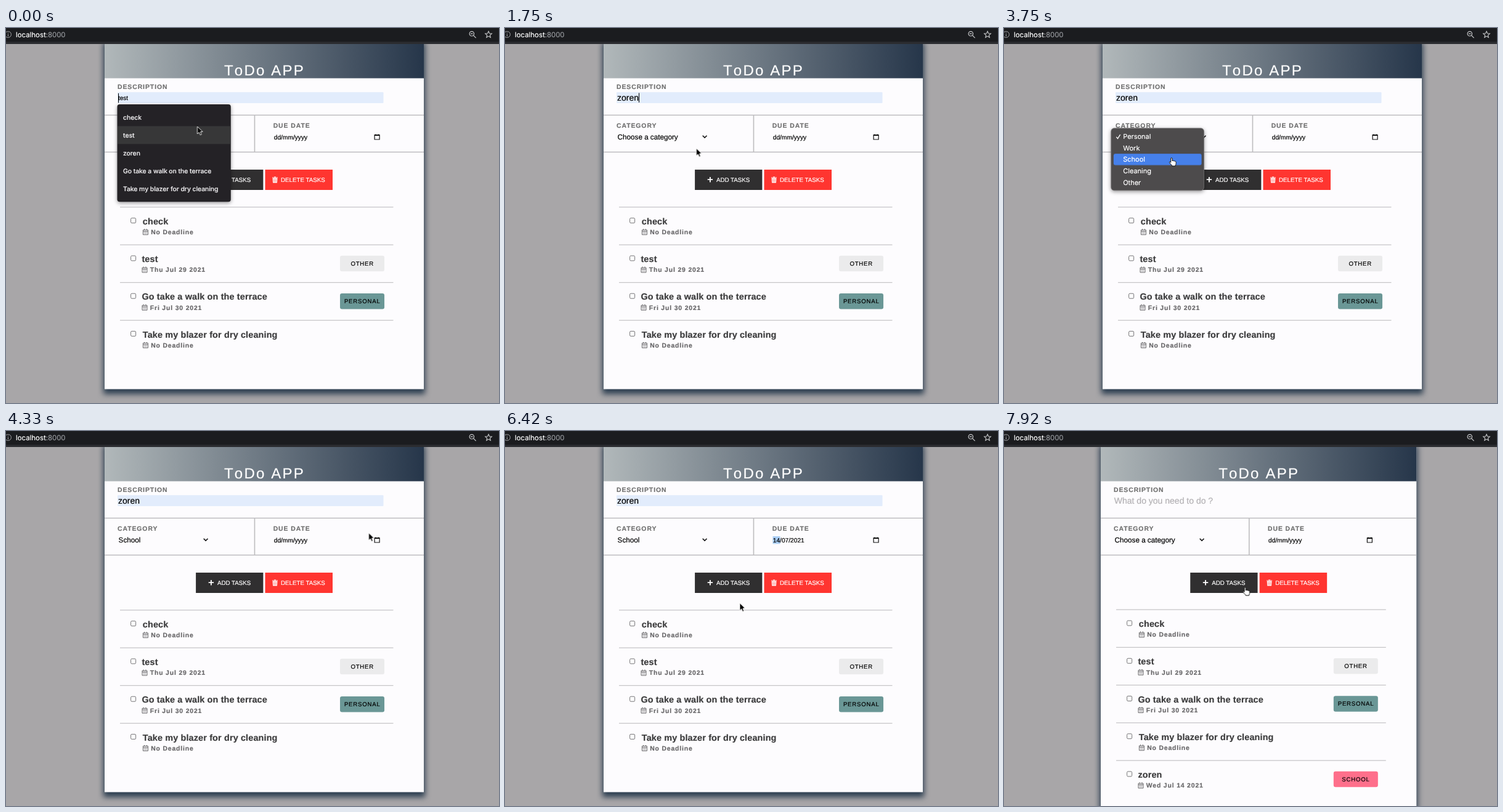
Write an HTML page that moves like this. It is 800 px wide and 609 px high and loops after 8000 ms.

```html
<!DOCTYPE html>
<html lang="en">
<head>
<meta charset="utf-8">
<title>ToDo APP</title>
<style>
  html, body { margin: 0; width: 100%; height: 100%; overflow: hidden; background: #a8a6a8; }
  svg { display: block; width: 800px; height: 609px; font-family: "Liberation Sans", Arial, sans-serif; }
  /* the hairline stroke gives text its slightly heavy rendering */
  text {
    white-space: pre; text-rendering: geometricPrecision;
    fill: currentColor; stroke: currentColor; stroke-width: .2px;
  }

  .shadow { filter: blur(4.8px); }
  .title { font-size: 24px; letter-spacing: 2.2px; font-kerning: none; color: #fff; }
  .label { font-size: 10.4px; font-weight: 700; letter-spacing: .95px; color: #707070; }
  .value { font-size: 14px; }
  .preview { font-size: 10px; }
  .hint { font-size: 14px; color: #b2b0b3; }
  .choice { font-size: 11.7px; }
  .date { font-size: 10.2px; }
  .button { font-size: 9.75px; color: #fff; }
  .task { font-size: 14.4px; font-weight: 700; letter-spacing: .15px; color: #3c3c3d; }
  .due { font-size: 10.4px; font-weight: 700; letter-spacing: .85px; color: #69686a; }
  .tag { font-size: 9.6px; letter-spacing: .8px; text-anchor: middle; }
  .rule { stroke: #bdbcbe; stroke-width: 1.6; }
  .thin { stroke: #c6c5c7; stroke-width: 1.2; }
  .line { fill: none; stroke: currentColor; }
  .suggest text { font: 500 10.4px Inter, sans-serif; letter-spacing: -.05px; color: #f1f0f2; }
  .menu text { font: 11px Inter, sans-serif; color: #fff; }
  .picker text { font-size: 8.7px; text-anchor: middle; }
  .picker .start { text-anchor: start; font-weight: 700; }
  .picker .faint { color: #757575; }
  .picker .today { color: #fff; font-weight: 700; }
  .picker .link { color: #1268e8; text-anchor: start; }
  .url { font: 11.4px Inter, sans-serif; color: #fff; }
  .port { color: #96999d; fill: currentColor; stroke: currentColor; }
  .popup { filter: drop-shadow(0 2px 3px #0006); }

  /* every hard change shares one 8 s clock */
  [class*="at-"] { animation: 8s step-end infinite; }
  .at-form { animation-name: form; }
  .at-added { animation-name: added; }
  .at-suggest { animation-name: suggest; }
  .at-first { animation-name: first; }
  .at-second { animation-name: second; }
  .at-filled { animation-name: filled; }
  .at-caret1 { animation-name: caret1; }
  .at-caret2 { animation-name: caret2; }
  .at-row { animation-name: row; }
  .at-menu { animation-name: menu; }
  .at-option { animation-name: option; }
  .at-unset { animation-name: unset-choice; }
  .at-chosen { animation-name: chosen; }
  .at-picker { animation-name: picker; }
  .at-day { animation-name: day; }
  .at-focus { animation-name: focus; }
  .at-nodate { animation-name: nodate; }
  .at-dated { animation-name: dated; }
  .at-arrow { animation-name: arrow; }
  .at-hand { animation-name: hand; }
  .pointer { animation: pointer 8s ease-in-out infinite; }

  @keyframes form { 0% { opacity: 1 } 92.75%, 100% { opacity: 0 } }
  @keyframes added { 0% { opacity: 0 } 92.75%, 100% { opacity: 1 } }
  @keyframes suggest { 0% { opacity: 1 } 21.875%, 100% { opacity: 0 } }
  @keyframes first { 0% { opacity: 1 } 9%, 100% { opacity: 0 } }
  @keyframes second { 0% { opacity: 0 } 9% { opacity: 1 } 21.875%, 100% { opacity: 0 } }
  @keyframes filled { 0% { opacity: 0 } 21.875%, 100% { opacity: 1 } }
  @keyframes caret1 { 0% { opacity: 1 } 6.25% { opacity: 0 } 12.5% { opacity: 1 } 18.75%, 100% { opacity: 0 } }
  @keyframes caret2 { 0% { opacity: 0 } 21.875% { opacity: 1 } 28.125%, 100% { opacity: 0 } }
  @keyframes row { 0% { transform: none } 9%, 100% { transform: translateY(29.1px) } }
  @keyframes menu { 0% { opacity: 0 } 29.125% { opacity: 1 } 49%, 100% { opacity: 0 } }
  @keyframes option {
    0% { transform: none } 40.6% { transform: translateY(18.6px) }
    43.5%, 100% { transform: translateY(37.2px) }
  }
  @keyframes unset-choice { 0% { opacity: 1 } 49%, 100% { opacity: 0 } }
  @keyframes chosen { 0% { opacity: 0 } 49%, 100% { opacity: 1 } }
  @keyframes picker { 0% { opacity: 0 } 60.4% { opacity: 1 } 71.875%, 100% { opacity: 0 } }
  @keyframes day { 0% { opacity: 0 } 66% { opacity: 1 } 71.875%, 100% { opacity: 0 } }
  @keyframes focus { 0% { opacity: 0 } 60.4%, 100% { opacity: 1 } }
  @keyframes nodate { 0% { opacity: 1 } 71.875%, 100% { opacity: 0 } }
  @keyframes dated { 0% { opacity: 0 } 71.875%, 100% { opacity: 1 } }
  @keyframes arrow { 0% { opacity: 1 } 25% { opacity: 0 } 49.8% { opacity: 1 } 86%, 100% { opacity: 0 } }
  @keyframes hand { 0% { opacity: 0 } 25% { opacity: 1 } 49.8% { opacity: 0 } 86%, 100% { opacity: 1 } }
  @keyframes pointer {
    0%, 5% { transform: translate(310.5px, 160px) }
    11.25%, 21.875% { transform: translate(310.5px, 195.5px) }
    26%, 38.5% { transform: translate(290.5px, 185px) }
    46.25%, 49% { transform: translate(272px, 211px) }
    54.125% { transform: translate(588.5px, 165.5px) }
    57.5%, 60.4% { transform: translate(600px, 175px) }
    67.5%, 71.875% { transform: translate(504.5px, 289.5px) }
    79.5%, 80.5% { transform: translate(381px, 279.5px) }
    87.5%, 100% { transform: translate(391.5px, 254px) }
  }
</style>
</head>
<body>
<svg id="stage" viewBox="0 0 800 609"></svg>
<script>
const text = (x, y, cls, str) => `<text x="${x}" y="${y}" class="${cls}">${str}</text>`;
const rect = (x, y, w, h, fill, rest = '') =>
  `<rect x="${x}" y="${y}" width="${w}" height="${h}" fill="${fill}" ${rest}/>`;
const line = (x1, y1, x2, y2, cls) => `<path d="M${x1} ${y1}L${x2} ${y2}" class="${cls}"/>`;
const icon = (x, y, d, color, width = 1) =>
  `<path class="line" transform="translate(${x} ${y})" d="${d}" color="${color}" stroke-width="${width}"/>`;
const group = (cls, ...parts) => `<g class="${cls}">${parts.join('')}</g>`;

const TAGS = { OTHER: '#ebebec', PERSONAL: '#6a9796', SCHOOL: '#fe6f8b' };
const TASKS = [
  ['check', 'No Deadline'],
  ['test', 'Thu Jul 29 2021', 'OTHER'],
  ['Go take a walk on the terrace', 'Fri Jul 30 2021', 'PERSONAL'],
  ['Take my blazer for dry cleaning', 'No Deadline'],
];
const NEW_TASK = ['zoren', 'Wed Jul 14 2021', 'SCHOOL'];

const smallCalendar = 'M.6 1.8h8v7.7h-8zM.6 4h8M2.7 0v2M6.5 0v2M2.3 5.6h1M4.1 5.6h1M5.9 5.6h1M2.3 7.5h1M4.1 7.5h1M5.9 7.5h1';

function taskRow([name, due, tag], i, left, right, top) {
  const y = top + i * 61.25;
  const x = left + (tag ? 60.4 : 61.8);
  const tagX = left + .7375 * (right - left);
  return line(left + 25, y, right - 49.5, y, 'thin')
    + rect(left + 42.6, y + 17.9, 8, 8, '#fff', 'rx="1.6" stroke="#757477"')
    + text(x, y + 28, 'task', name)
    + icon(x, y + 35.4, smallCalendar, '#69686a')
    + text(x + 13.4, y + 44.2, 'due', due)
    + (tag ? rect(tagX, y + 17.6, 72, 25.6, TAGS[tag], 'rx="3.2"')
      + text(tagX + 36.2, y + 33.8, 'tag', tag) : '');
}

function page({ cls, left, right, bottom, listTop, tasks, fields }) {
  const width = right - left;
  const mid = left + width / 2;
  const split = left + .47 * width;
  const add = mid - 110.9, del = mid + 1.5;
  return group(cls,
    rect(left - 2, 24, width + 4, bottom - 16, '#2c3e50', 'class="shadow"'),
    rect(left, 20, width, bottom - 20, '#fdfcfe'),
    rect(left, 26, width, 55.6, 'url(#slate)'),
    text(mid - 65, 76.5, 'title', 'ToDo APP'),
    text(left + 21, 98.9, 'label', 'DESCRIPTION'),
    line(left, 141.5, right, 141.5, 'rule'),
    line(left, 201.5, right, 201.5, 'rule'),
    line(split, 141.5, split, 201.5, 'rule'),
    text(left + 21, 161.8, 'label', 'CATEGORY'),
    icon(left + 160.7, 174.7, 'M0 0l3.4 3.4 3.4-3.4', '#111', 1.6),
    text(split + 30.2, 161.8, 'label', 'DUE DATE'),
    icon(right - 80.5, 172.4, 'M.6 1.2h8v7.4h-8zM.6 2h8M2.2 0v1M7 0v1', '#111', 1.2),
    rect(add, 230, 109.3, 33, '#302f30'),
    icon(add + 20.6, 242, 'M4.2 0v8.4M0 4.2h8.4', '#fff', 1.8),
    text(add + 34.9, 249.9, 'button', 'ADD TASKS'),
    rect(del, 230, 109.5, 33, '#ff3530'),
    icon(del + 11.5, 241.8, 'M0 1.2h9M3 .3h3', '#fff', 1.2),
    `<path transform="translate(${del + 12.1} 244)" d="M0 0h7.8l-.5 7.6h-6.8z" fill="#fff"/>`,
    icon(del + 14, 245.2, 'M0 0v5M2 0v5M4 0v5', '#ff3530', .6),
    text(del + 25.5, 249.9, 'button', 'DELETE TASKS'),
    ...tasks.map((task, i) => taskRow(task, i, left, right, listTop)),
    fields(left, split));
}

const busyFields = (left, split) => [
  rect(181, 104.3, 431.5, 17.7, '#e2ecfc', 'rx="1"'),
  text(182, 117.4, 'preview at-first', 'test'),
  text(182, 117.4, 'preview at-second', 'zoren'),
  text(182, 117.9, 'value at-filled', 'zoren'),
  rect(182, 106, 1, 15.5, '#000', 'class="at-caret1"'),
  rect(217, 105.5, 1, 15.5, '#000', 'class="at-caret2"'),
  text(left + 22.6, 180.6, 'choice at-unset', 'Choose a category'),
  text(left + 22.6, 180.6, 'choice at-chosen', 'School'),
  rect(434.5, 171, 12, 12.3, '#a9cdf4', 'class="at-focus"'),
  text(split + 31.3, 180.6, 'date at-nodate', 'dd/mm/yyyy'),
  text(split + 31.3, 180.6, 'date at-dated', '14/07/2021'),
].join('');

const emptyFields = (left, split) =>
  text(left + 21.8, 117.6, 'hint', 'What do you need to do ?')
  + text(left + 22.6, 180.6, 'choice', 'Choose a category')
  + text(split + 31.3, 180.6, 'date', 'dd/mm/yyyy');

function suggestions() {
  const names = ['check', 'test', 'zoren', TASKS[2][0], TASKS[3][0]];
  return group('at-suggest', group('suggest popup',
    rect(180.5, 124, 184.3, 158.3, '#242226', 'rx="4"'),
    rect(181, 159.3, 183.3, 29.1, '#373738', 'class="at-row"'),
    ...names.map((name, i) => text(190, 149 + i * 29.1, '', name))));
}

function categoryMenu() {
  const names = ['Personal', 'Work', 'School', 'Cleaning', 'Other'];
  return group('at-menu', group('menu popup',
    rect(173.8, 162.8, 150.6, 101, '#4d4b4c', 'rx="5" stroke="#777577" stroke-width=".8"'),
    rect(177.8, 167, 142.8, 18.6, '#4680ea', 'rx="3" class="at-option"'),
    icon(182.3, 173.2, 'M0 3.6l2.2 2.8L6.3 0', '#fff', 1.3),
    ...names.map((name, i) => text(193.2, 180.2 + i * 18.6, '', name))));
}

function datePicker() {
  const colX = c => 451.7 + c * 20.4;
  const days = Array.from({ length: 42 }, (_, i) => {
    const day = i < 4 ? 27 + i : (i - 4) % 31 + 1;
    const faint = i < 4 || i > 34;
    const cls = faint ? 'faint' : day === 30 ? 'today' : '';
    return text(colX(i % 7), 252.6 + Math.floor(i / 7) * 20.4, cls, day);
  });
  return group('at-picker', group('picker',
    rect(433.5, 184.5, 159.3, 204.5, '#fff', 'stroke="#767578" class="popup"'),
    text(441.5, 204.9, 'start', 'July 2021'),
    '<path d="M483.5 200.4h5.4l-2.7 3z"/>',
    icon(550.6, 196.6, 'M0 11V.7M-5 5.6L0 .6l5 5', '#222'),
    icon(574.2, 196.6, 'M0 0v10.3M-5 5.4l5 5 5-5', '#222'),
    ...[...'SMTWTFS'].map((d, c) => text(colX(c), 230.5, '', d)),
    rect(502.8, 280, 20.2, 20, '#a9cdf4', 'class="at-day"'),
    rect(543.5, 320.4, 20.4, 20.2, '#1064f0'),
    ...days,
    text(553, 377, 'link', 'Today')));
}

const browserBar = rect(0, 0, 800, 26, '#2b2c30') + rect(0, 0, 800, 22.3, '#1b1c1f')
  + '<circle cx="3.4" cy="10.5" r="5" fill="none" stroke="#a5a6a9"/>'
  + icon(3.4, 7.5, 'M0 0v1.2M0 2.6v3.6', '#a5a6a9', 1.1)
  + text(16, 14.7, 'url', 'localhost<tspan class="port">:8000</tspan>')
  + '<circle cx="755.8" cy="9.3" r="3.7" fill="none" stroke="#c9cacc" stroke-width="1.2"/>'
  + icon(754, 9.3, 'M0 0h3.6M4.6 2.8l4 4', '#c9cacc', 1.2)
  + icon(783, 5.3, 'M0 0l1.5 3.5 3.8.3-2.9 2.5.9 3.7L0 8l-3.3 2 .9-3.7-2.9-2.5 3.8-.3z', '#c9cacc', 1.1);

const pointer = group('pointer',
  '<path class="at-arrow" d="M0 0v12l2.8-2.5 1.9 4.2 2.1-.9L5 8.7l3.7-.3z" stroke="#fff" stroke-width=".9"/>',
  `<path class="at-hand" d="M-1.3 1q0-1.2 1.1-1.2T1 1v4q.2-.9 1.2-.8 1 .1 1 1 .3-.7 1.2-.5.9.2.9 1
    .3-.5 1-.3.8.3.8 1.3v2.6q0 1.6-1 2.8v1H.6v-.9L-2.5 9q-1.6-2-1-2.6.7-.6 2.2 1z"
    fill="#fff" stroke="#111" stroke-width="1" stroke-linejoin="round"/>`);

document.getElementById('stage').innerHTML = `
  <defs><linearGradient id="slate">
    <stop stop-color="#b1b8ba"/><stop offset="1" stop-color="#26364a"/>
  </linearGradient></defs>`
  + rect(0, 0, 800, 609, '#a8a6a8')
  + page({ cls: 'at-form', left: 160, right: 678, bottom: 586.5, listTop: 290.8,
      tasks: TASKS, fields: busyFields })
  + page({ cls: 'at-added', left: 157, right: 669.3, bottom: 700, listTop: 290.1,
      tasks: [...TASKS, NEW_TASK], fields: emptyFields })
  + suggestions() + categoryMenu() + datePicker() + browserBar + pointer;
</script>
</body>
</html>
```
